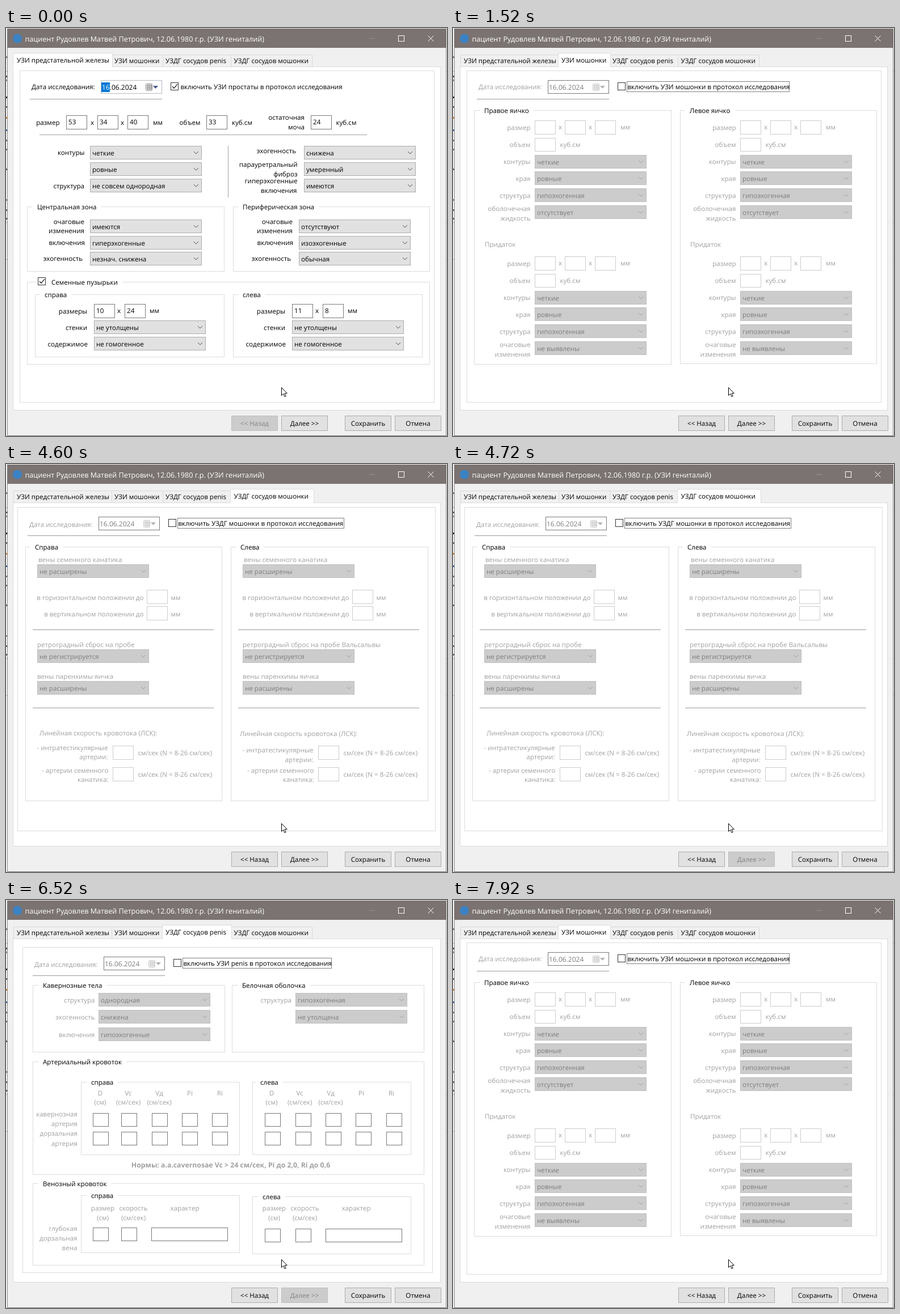
An HTML page that plays this animation: 777x720 px, repeating every 8000 ms.

```html
<!DOCTYPE html>
<html lang="ru">
<head>
<meta charset="utf-8">
<title>УЗИ</title>
<style>
  html, body { margin: 0; width: 100%; height: 100%; overflow: hidden; background: #fff; }
  svg { display: block; width: 777px; height: 720px; }
  text {
    font: 11.6px "Open Sans", "Noto Sans", sans-serif;
    text-rendering: geometricPrecision;
    white-space: pre;
  }
  .bold { font-size: 12.25px; font-weight: 700; }
  .title { font-size: 12.6px; }
  .date { font-size: 12px; }
  .anim { animation: 8s step-end infinite; }
  #prostate { animation-name: prostate; }
  #scrotum { animation-name: scrotum; }
  #vessels { animation-name: vessels; }
  #flow { animation-name: flow; }
  #repaint { animation-name: repaint; }
  #backOff { animation-name: backOff; }
  #nextOff { animation-name: nextOff; }
  @keyframes prostate { 0% { opacity: 1 } 14.5%, 100% { opacity: 0 } }
  @keyframes scrotum { 0% { opacity: 0 } 14.5% { opacity: 1 } 35% { opacity: 0 } 99%, 100% { opacity: 1 } }
  @keyframes vessels { 0% { opacity: 0 } 35% { opacity: 1 } 57.5% { opacity: 0 } 81.5% { opacity: 1 } 99%, 100% { opacity: 0 } }
  @keyframes flow { 0% { opacity: 0 } 57.5% { opacity: 1 } 80.5%, 100% { opacity: 0 } }
  @keyframes repaint { 0% { opacity: 0 } 80.5% { opacity: 1 } 81.5%, 100% { opacity: 0 } }
  @keyframes backOff {
    0% { opacity: 1 }
    14.5% { opacity: 1; animation-timing-function: steps(5, end) }
    19%, 100% { opacity: 0 }
  }
  @keyframes nextOff {
    0% { opacity: 0 }
    58% { opacity: .5 }
    59% { opacity: 1 }
    81.5% { opacity: 1; animation-timing-function: steps(5, end) }
    86%, 100% { opacity: 0 }
  }
</style>
</head>
<body>
<svg id="stage" viewBox="0 0 777 720"></svg>
<script>
const stage = document.getElementById('stage');
const BLACK = '#000', GREY = '#a0a0a0', FRAME = '#dcdcdc';
let layer = stage;
let ink = BLACK;

function add(tag, attrs, parent = layer) {
  const node = document.createElementNS('http://www.w3.org/2000/svg', tag);
  for (const key in attrs) node.setAttribute(key, attrs[key]);
  return parent.appendChild(node);
}

// Runs draw() inside a new group.
function group(attrs, draw) {
  const outer = layer;
  layer = add('g', attrs);
  draw();
  layer = outer;
}

const shift = (dx, dy, draw) => group({ transform: `translate(${dx} ${dy})` }, draw);
const fill = (x, y, width, height, color) => add('rect', { x, y, width, height, fill: color });
const path = (d, stroke, more = {}) => add('path', { d, stroke, fill: 'none', ...more });
const hline = (x1, x2, y, color = GREY) => fill(x1, y, x2 - x1, 1, color);

// Box with a 1px border; edges are the pixel columns and rows of that border.
const box = (x1, y1, x2, y2, stroke, color = 'none') => add('rect', {
  x: x1 + .5, y: y1 + .5, width: x2 - x1, height: y2 - y1, fill: color, stroke
});

// Text placed by its vertical centre.
function text(x, y, str, { anchor = 'start', color = ink, cls = '' } = {}) {
  const node = add('text', { x, y: y + 4, 'text-anchor': anchor, fill: color, class: cls });
  node.textContent = str;
  return node;
}
const right = (x, y, str) => text(x, y, str, { anchor: 'end' });
const mid = (x, y, str) => text(x, y, str, { anchor: 'middle' });

function edit(x, y, value = '', w = 36, h = 24, border = ink === BLACK ? '#7a7a7a' : '#cccccc') {
  box(x, y, x + w, y + h, border, '#fff');
  if (value) text(x + 4, y + 12, value);
}

function combo(x, y, value) {
  const on = ink === BLACK;
  box(x, y, x + 196, y + 23, on ? '#adadad' : '#bfbfbf', on ? '#e1e1e1' : '#ccc');
  text(x + 4, y + 12.5, value, { color: on ? BLACK : '#7d7d7d' });
  path(`M${x + 183} ${y + 10}l4 4l4 -4`, on ? '#505050' : '#a0a0a0');
}

function fieldset(x1, y1, x2, y2, title, tx, gap = tx - 8) {
  box(x1, y1, x2, y2, FRAME);
  const label = text(tx, y1 + 1, title, { color: BLACK });
  const cover = fill(gap, y1 - 1, tx + label.getComputedTextLength() + 8 - gap, 3, '#fff');
  layer.insertBefore(cover, label);
}

function checkbox(x, y, checked) {
  box(x, y, x + 13, y + 13, '#333', '#fff');
  if (checked) path(`M${x + 3} ${y + 7}l3 3.2l6 -7`, '#222', { 'stroke-width': 1.3 });
}

function datePicker(x, y, on) {
  box(x, y - 1, x + 107, y + 22, on ? '#b4bac2' : '#7a7a7a', '#fff');
  if (on) fill(x + 1, y + 3, 15, 17, '#0078d7');
  const day = text(x + 2, y + 12, '', { color: on ? BLACK : '#7d7d7d', cls: 'date' });
  const sel = add('tspan', { fill: on ? '#fff' : '#7d7d7d' }, day);
  sel.textContent = '16';
  day.append('.06.2024');
  const c = on ? '#8c8c8c' : '#c8c8c8';
  add('rect', { x: x + 79.5, y: y + 5.5, width: 11, height: 12, rx: 2, fill: on ? '#e6e6e6' : '#f2f2f2', stroke: c });
  for (let i = 0; i < 3; i++) {
    hline(x + 81, x + 90, y + 8 + i * 3, c);
    fill(x + 82 + i * 3, y + 7, 1, 9, c);
  }
  add('path', { d: `M${x + 92} ${y + 9}h9l-4.5 5z`, fill: on ? '#44598c' : '#b4b4b4' });
}

// Date with its label and rule, then the check box and its caption.
function header(x, y, labelY, caption, on, cx, cy, focusEnd) {
  text(x - 122, labelY, 'Дата исследования:');
  datePicker(x, y, on);
  hline(x - 125, x + 108, y + 32, '#9a9a9a');
  checkbox(cx, cy, on);
  text(cx + 17.5, cy + 8, caption, { color: BLACK });
  if (!on) path(`M${cx + 16.5} ${cy - 1.5}H${focusEnd + .5}v18H${cx + 16.5}z`, BLACK, { 'stroke-dasharray': '1 1' });
}

const TABS = [
  ['УЗИ предстательной железы', 13, 186, 19],
  ['УЗИ мошонки', 186, 276, 191],
  ['УЗДГ сосудов penis', 276, 396, 281],
  ['УЗДГ сосудов мошонки', 396, 539, 401.5]
];
function tabs(active) {
  TABS.forEach(([name, x1, x2, tx], i) => {
    box(x1, 47, x2, 68, '#d9d9d9', '#f0f0f0');
    if (i !== active) text(tx, 58, name, { color: BLACK });
  });
  hline(12, 766, 68, FRAME);
  const [name, x1, x2, tx] = TABS[active];
  const l = x1 - 1, r = x2 + (active === 3 ? 3 : 1);
  fill(l, 44, r - l + 1, 26, '#fff');
  path(`M${l + .5} 69V44.5H${r + .5}V69`, FRAME);
  text(tx, 56.5, name, { color: BLACK });
}

function page(id, tab, color, draw) {
  group({ id, class: 'anim' }, () => {
    ink = color;
    tabs(tab);
    draw();
    ink = BLACK;
  });
}

function button(x, label, off) {
  box(x, 684, x + 81, 710, off ? '#bfbfbf' : '#adadad', off ? '#ccc' : '#e1e1e1');
  text(x + 41, 698, label, { anchor: 'middle', color: off ? '#838383' : BLACK });
}

function chrome() {
  fill(0, 0, 777, 720, '#f4f4f4');
  [[50, '#777'], [84, '#555'], [91, '#999'], [121, '#222'], [138, '#666'], [157, '#d9822b'], [179, '#3568b0'],
   [197, '#777'], [213, '#777'], [248, '#666'], [302, '#888'], [320, '#666'], [335, '#666']]
    .forEach(([y, c]) => fill(0, y, 2, 3, c));
  [76, 343, 408].forEach(y => hline(0, 777, y, '#aaa'));
  fill(2, 1, 774, 719, '#f0f0f0');
  fill(2, 1, 774, 34, '#7a7371');
  fill(2, 35, 1, 685, '#8d8886');
  fill(775, 35, 1, 685, '#8d8886');
  hline(2, 776, 719, '#77716f');
  add('circle', { cx: 20, cy: 18.5, r: 8, fill: '#3b82c4' });
  text(33.5, 19.5, 'пациент Рудовлев Матвей Петрович, 12.06.1980 г.р. (УЗИ гениталий)', { color: '#fff', cls: 'title' });
  hline(640, 650, 18, '#979290');
  box(691, 13, 701, 23, '#fff');
  path('M743.5 13.5l10 10m0 -10l-10 10', '#fff');
  box(12, 68, 765, 674, FRAME, '#fff');
  button(397, '<< Назад');
  button(485, 'Далее >>');
  button(597, 'Сохранить');
  button(685, 'Отмена');
  group({ id: 'backOff', class: 'anim' }, () => button(397, '<< Назад', true));
  group({ id: 'nextOff', class: 'anim' }, () => button(485, 'Далее >>', true));
}

function prostate() {
  box(24, 75, 754, 660, FRAME);
  header(167, 93, 104, 'включить УЗИ простаты в протокол исследования', true, 290, 96);
  right(94.5, 167, 'размер');
  edit(106, 154, '53');
  mid(152, 167, 'x');
  edit(161, 154, '34');
  mid(205, 167, 'x');
  edit(214, 154, '40');
  text(259, 167, 'мм');
  right(342.5, 167, 'объем');
  edit(353, 154, '33');
  text(398, 167, 'куб.см');
  right(526, 158, 'остаточная');
  right(526, 175, 'моча');
  edit(537, 154, '24');
  text(581.5, 167, 'куб.см');
  hline(59, 636, 188);
  right(138.5, 220, 'контуры');
  right(138, 279, 'структура');
  combo(148, 208, 'четкие');
  combo(148, 237, 'ровные');
  combo(148, 266, 'не совсем однородная');
  fill(391, 208, 1, 91, GREY);
  right(511, 217, 'эхогенность');
  right(513.5, 241, 'парауретральный');
  right(513.5, 258, 'фиброз');
  right(513.5, 270, 'гиперэхогенные');
  right(512.5, 287, 'включения');
  combo(525, 208, 'снижена');
  combo(525, 237, 'умеренный');
  combo(525, 266, 'имеются');

  const zone = (x, lx, cx, title, tx, values) => {
    fieldset(x, 315, x + (x > 300 ? 346 : 347), 429, title, tx);
    right(lx, 342, 'очаговые');
    right(lx, 358, 'изменения');
    right(lx + 1, 379, 'включения');
    right(lx - 3, 407, 'эхогенность');
    values.forEach((v, i) => combo(cx, [338, 367, 395][i], v));
  };
  zone(37, 138, 148, 'Центральная зона', 55, ['имеются', 'гиперэхогенные', 'незнач. снижена']);
  zone(400, 505, 516, 'Периферическая зона', 417, ['отсутствуют', 'изоэхогенные', 'обычная']);

  fieldset(37, 448, 746, 593, 'Семенные пузырьки', 80, 52);
  checkbox(56, 440, true);
  fieldset(51, 470, 384, 580, 'справа', 68);
  fieldset(400, 470, 733, 580, 'слева', 417);
  [[0, '10', '24'], [349, '11', '8']].forEach(([dx, a, b]) => shift(dx, 0, () => {
    right(143, 500, 'размеры');
    edit(155, 487, a);
    mid(199, 499, 'x');
    edit(209, 487, b);
    text(253, 499, 'мм');
    right(143, 529, 'стенки');
    combo(155, 516, 'не утолщены');
    right(144, 558, 'содержимое');
    combo(155, 545, 'не гомогенное');
  }));
}

function organ(values, lastLabel) {
  right(136.5, 176, 'размер');
  [144, 197, 250].forEach(x => edit(x, 163));
  mid(189, 175, 'x');
  mid(242, 175, 'x');
  text(295, 175, 'мм');
  right(136.5, 206, 'объем');
  edit(144, 194, '', 36, 23);
  text(188.5, 206, 'куб.см');
  ['контуры', 'края', 'структура'].forEach((s, i) => right(136.5, 236 + i * 30, s));
  lastLabel.forEach((s, i) => right(136.5, 318.5 + i * 17, s));
  values.forEach((v, i) => combo(144, [224, 253, 283, 313][i], v));
}

function scrotum() {
  box(24, 75, 754, 660, FRAME);
  header(167, 93, 104, 'включить УЗИ мошонки в протокол исследования', false, 290, 96, 592);
  fieldset(37, 145, 384, 593, 'Правое яичко', 55);
  fieldset(400, 145, 746, 592, 'Левое яичко', 417);
  const base = ['четкие', 'ровные', 'гипоэхогенная'];
  [0, 362].forEach(dx => shift(dx, 0, () => {
    organ([...base, 'отсутствует'], ['оболочечная', 'жидкость']);
    text(56, 382, 'Придаток');
    shift(0, 240, () => organ([...base, 'не выявлены'], ['очаговые', 'изменения']));
  }));
}

// Measurement fields of one body side: two rows of five, then three below.
function sideBoxes(cols, wideX, lowY) {
  const field = (x, y, w = 27) => edit(x, y, '', w, 23, '#777');
  for (const y of [376, 409]) cols.forEach(x => field(x, y));
  cols.slice(0, 2).forEach(x => field(x, lowY));
  field(wideX, lowY, 134);
}

function vesselBoxes() {
  sideBoxes([153, 203, 257, 310, 363], 256, 578);
  sideBoxes([456, 510, 563, 616, 670], 563, 580);
}

function vessels() {
  box(29, 83, 751, 657, FRAME);
  header(172, 101, 114, 'включить УЗИ penis в протокол исследования', false, 295, 104, 573);
  fieldset(47, 150, 385, 268, 'Кавернозные тела', 65);
  fieldset(398, 150, 736, 268, 'Белочная оболочка', 416);
  ['структура', 'эхогенность', 'включения'].forEach((s, i) => right(156.5, [177, 207, 238][i], s));
  combo(163, 164, 'однородная');
  combo(163, 194, 'снижена');
  combo(163, 225, 'гипоэхогенные');
  right(503, 177, 'структура');
  combo(510, 164, 'гипоэхогенная');
  combo(510, 194, 'не утолщена');

  fieldset(47, 285, 736, 484, 'Артериальный кровоток', 65);
  fieldset(132, 321, 411, 449, 'справа', 150);
  fieldset(434, 321, 713, 449, 'слева', 448);
  [0, 302].forEach(dx => shift(dx, 0, () => {
    ['D', 'Vc', 'Vд', 'Pi', 'Ri'].forEach((s, i) => mid([166, 215.5, 270, 324, 377][i], 340.5, s));
    ['(см)', '(см/сек)', '(см/сек)'].forEach((s, i) => mid([166, 215.5, 270][i], 357, s));
  }));
  ['кавернозная', 'артерия', 'дорзальная', 'артерия'].forEach((s, i) => right(126, [378, 395, 411.5, 430][i], s));
  text(396, 467.5, 'Нормы: a.a.cavernosae Vc > 24 см/сек, Pi до 2,0, Ri до 0,6', { anchor: 'middle', cls: 'bold' });

  fieldset(47, 500, 736, 644, 'Венозный кровоток', 65);
  fieldset(132, 521, 411, 622, 'справа', 150);
  fieldset(434, 523, 713, 624, 'слева', 452);
  [0, 302].forEach(dx => shift(dx, 0, () => {
    mid(170.5, 544, 'размер');
    mid(170.5, 561, '(см)');
    mid(224.5, 544, 'скорость');
    mid(224.5, 561, '(см/сек)');
    mid(315, 544, 'характер');
  }));
  ['глубокая', 'дорзальная', 'вена'].forEach((s, i) => right(125.5, 579.5 + i * 17, s));
  vesselBoxes();
}

function flow() {
  box(20, 76, 756, 647, FRAME);
  header(163, 94, 107, 'включить УЗДГ мошонки в протокол исследования', false, 286, 97, 595);
  fieldset(34, 146, 380, 594, 'Справа', 51);
  fieldset(396, 146, 743, 594, 'Слева', 413);
  [0, 362].forEach(dx => shift(dx, 0, () => {
    text(57, 168.5, 'вены семенного канатика');
    combo(55, 177, 'не расширены');
    right(242.5, 236, 'в горизонтальном положении до');
    edit(248, 222);
    text(290.5, 236, 'мм');
    right(242.5, 265, 'в вертикальном положении до');
    edit(248, 251);
    text(290.5, 265, 'мм');
    hline(47, 366, 292, '#9a9a9a');
    text(55, 318.5, 'ретроградный сброс на пробе' + (dx ? ' Вальсальвы' : ''));
    combo(55, 327, 'не регистрируется');
    text(55, 374.5, 'вены паренхимы яичка');
    combo(55, 383, 'не расширены');
    hline(47, 366, 430, '#9a9a9a');
    text(dx ? 50 : 59, dx ? 476 : 475, 'Линейная скорость кровотока (ЛСК):');
    const drop = dx ? 4.5 : 0;
    right(179.5, 500.5 + drop, '- интратестикулярные');
    right(179.5, 517 + drop, 'артерии:');
    edit(188, 497);
    text(232.5, 509.5, 'см/сек (N = 8-26 см/сек)');
    right(180.5, 540.5, '- артерии семенного');
    right(180.5, 557, 'канатика:');
    edit(188, 535);
    text(232.5, 547.5, 'см/сек (N = 8-26 см/сек)');
  }));
}

// Half-redrawn tab: leftovers of the old page show through the new controls.
function repaint() {
  const clip = add('clipPath', { id: 'holes' });
  [[295, 101, 294, 14], [163, 164, 197, 24], [163, 194, 197, 24], [163, 225, 197, 24], [510, 164, 197, 24], [510, 194, 197, 24]]
    .forEach(([x, y, width, height]) => add('rect', { x, y, width, height }, clip));
  group({ 'clip-path': 'url(#holes)' }, flow);
  path('M29.5 310V83.5H751.5V253', FRAME);
  vesselBoxes();
}

chrome();
page('prostate', 0, BLACK, prostate);
page('scrotum', 1, GREY, scrotum);
page('vessels', 2, GREY, vessels);
page('flow', 3, GREY, flow);
page('repaint', 3, GREY, repaint);
path('M485.5 634.5v14l3.2 -3l2.3 5.2l2.2 -1l-2.3 -5h4.4z', '#000', { fill: '#fff' });
</script>
</body>
</html>
```
